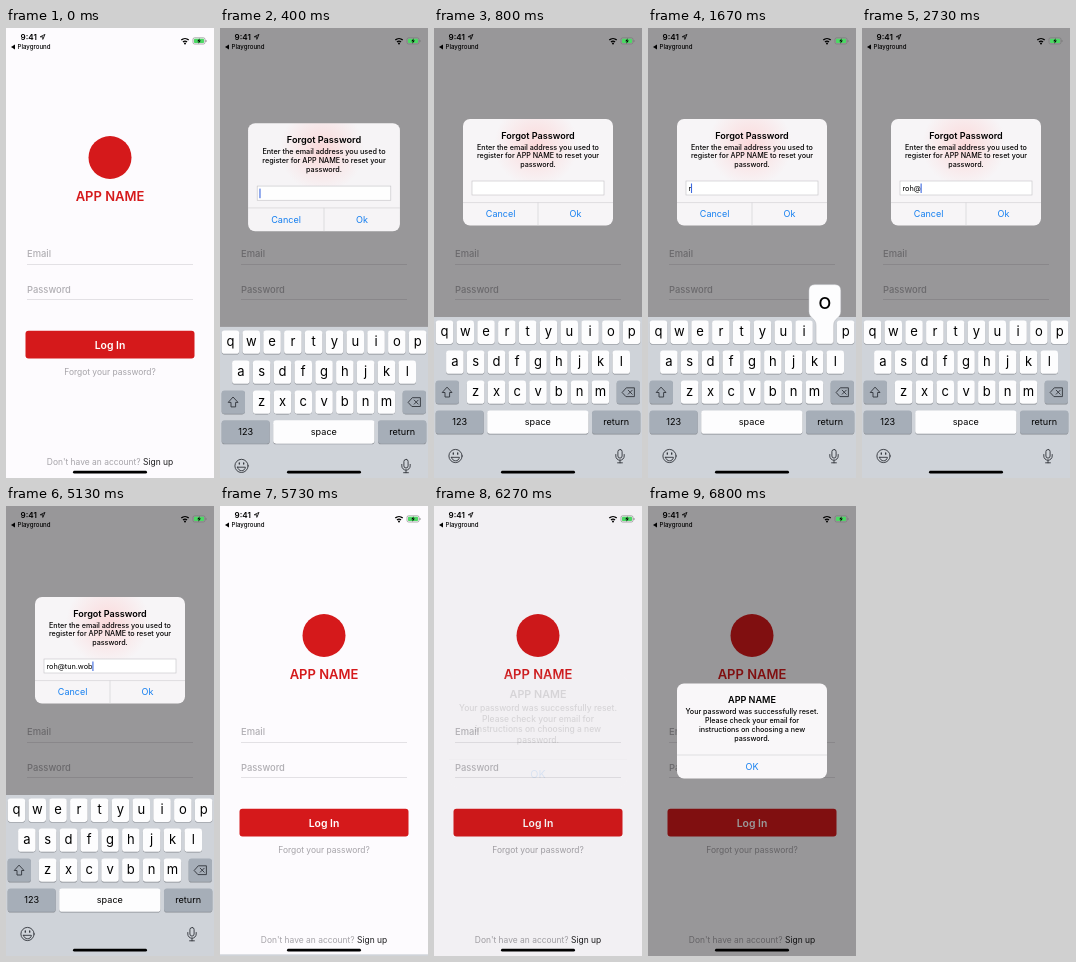
Write an HTML page that moves like this. It is 208 px wide and 450 px high and loops after 6870 ms.

```html
<!DOCTYPE html>
<html lang="en">
<head>
<meta charset="utf-8">
<title>Password reset</title>
<style>
  html, body { margin: 0; width: 100%; height: 100%; overflow: hidden; background: #fdfbfe; }
  svg { display: block; width: 208px; height: 450px; font-family: Inter, Roboto, sans-serif; }
  text { white-space: pre; }
  .mid { text-anchor: middle; }
  .title { font-size: 9.05px; font-weight: 600; }
  .msg { font-size: 7.15px; font-weight: 500; }
  .action { font-size: 9px; fill: #147ff0; }
  .hint { font-size: 9.4px; font-weight: 500; fill: #b0aeb3; }
  .small { font-size: 8.45px; fill: #a5a3a8; }
  .rule { stroke: #e3e1e5; stroke-width: 1; }
  .split { stroke: #cfcdd1; stroke-width: .6; }
  .line { fill: none; stroke: #30343a; stroke-width: .9; stroke-linejoin: round; stroke-linecap: round; }
</style>
</head>
<body>
<svg viewBox="0 0 208 450">
  <defs>
    <radialGradient id="glow" gradientUnits="userSpaceOnUse" cx="102" cy="117" r="42">
      <stop offset="0" stop-color="#fbd9da"/>
      <stop offset="1" stop-color="#f7f5f7"/>
    </radialGradient>
  </defs>

  <rect width="208" height="450" fill="#fdfbfe"/>
  <circle cx="104" cy="129.5" r="21.5" fill="#d5191b"/>
  <text class="mid" x="104" y="172.8" font-size="13" font-weight="600" fill="#d5191b">APP NAME</text>
  <text class="hint" x="21" y="229.2">Email</text>
  <path class="rule" d="M21 236.5H187M21 271.5H187"/>
  <text class="hint" x="21" y="264.6">Password</text>
  <rect x="19.5" y="302.8" width="169" height="27.6" rx="3" fill="#d5191b"/>
  <text class="mid" x="104" y="320.5" font-size="10.4" font-weight="600" fill="#fff">Log In</text>
  <text id="forgot" class="mid small" x="104" y="347.4">Forgot your password?</text>
  <text class="mid small" x="104" y="436.8">Don't have an account? <tspan fill="#1c1c1e">Sign up</tspan></text>

  <rect id="dim" width="208" height="450"/>

  <g id="ask">
    <rect x="29" y="91" width="150" height="106.6" rx="7" fill="url(#glow)"/>
    <path id="okPress" d="M104 174.6H179V190.6a7 7 0 0 1-7 7H104Z" fill="#dddbde"/>
    <text class="mid title" x="104" y="110.8">Forgot Password</text>
    <text class="mid msg" x="104" y="121.5">Enter the email address you used to</text>
    <text class="mid msg" x="104" y="130.4">register for APP NAME to reset your</text>
    <text class="mid msg" x="104" y="139.3">password.</text>
    <rect x="38" y="153" width="132" height="14" fill="#fff" stroke="#c3c1c5" stroke-width=".6"/>
    <text id="typed" x="40.4" y="162.6" font-size="7.3"></text>
    <rect id="caret" y="155.5" width="1.1" height="9.5" fill="#3f6be0"/>
    <path class="split" d="M29 174.6H179M104 174.6V197.6"/>
    <text class="mid action" x="66.6" y="189.2">Cancel</text>
    <text class="mid action" x="141.5" y="189.2">Ok</text>
  </g>

  <g id="done">
    <rect x="29" y="177.5" width="150" height="95" rx="7" fill="#f9f7f9"/>
    <text class="mid title" x="104" y="197">APP NAME</text>
    <text class="mid msg" x="104" y="208.2">Your password was successfully reset.</text>
    <text class="mid msg" x="104" y="217.1">Please check your email for</text>
    <text class="mid msg" x="104" y="226">instructions on choosing a new</text>
    <text class="mid msg" x="104" y="234.9">password.</text>
    <path class="split" d="M29 249H179"/>
    <text class="mid action" x="104" y="264.2">OK</text>
  </g>

  <g id="keyboard">
    <rect y="289" width="208" height="163" fill="#cfd3d9"/>
    <g id="common"></g>
    <g id="letters"></g>
    <g id="symbols"></g>
    <g class="line">
      <circle cx="21.5" cy="428" r="6.6"/>
      <path d="M17.6 429.3H25.4C25 434 18 434 17.6 429.3Z"/>
      <path d="M19.3 425v1.2M23.7 425v1.2" stroke-width="1.3"/>
      <rect x="183.9" y="421.5" width="4.2" height="8.6" rx="2.1"/>
      <path d="M181.8 426.5v1.5a4.2 4.2 0 0 0 8.4 0v-1.5M186 432.2v2.6M183.6 434.8h4.8"/>
    </g>
    <g id="popup">
      <path fill="#fdfdfe" stroke="#a9acb1" stroke-width=".4"/>
      <text class="mid" font-size="22"></text>
    </g>
  </g>

  <text x="14.5" y="12" font-size="8.1" font-weight="600">9:41</text>
  <path d="M39 6.4 36.8 11.4V8.8H34.2Z" fill="none" stroke="#000" stroke-width=".8"/>
  <path d="M9 16.4v5L5 18.9Z"/>
  <text x="11.5" y="21.3" font-size="6.1" font-weight="500">Playground</text>
  <path d="M175.3 12.1a5.4 5.4 0 0 1 7.4 0M177 14a3 3 0 0 1 4 0" fill="none" stroke="#000" stroke-width="1.4"/>
  <circle cx="179" cy="15.5" r="1"/>
  <rect x="187" y="9.8" width="12" height="6.2" rx="1.6" fill="none" stroke="#777" stroke-width=".6"/>
  <rect x="188" y="10.8" width="10" height="4.2" rx=".8" fill="#4cd964"/>
  <path d="M193.8 10.2 191.2 13.3H192.8L192.3 15.7 194.9 12.5H193.2Z"/>
  <path d="M200 12v2" stroke="#777" stroke-width=".8"/>
  <rect x="67" y="442.8" width="74" height="2.8" rx="1.4"/>
</svg>

<script>
const LOOP = 6870;
const OPEN = 155, CLOSE = 5370, RESULT = 6250;
const KEYBOARD = 161;
const $ = id => document.getElementById(id);
const rowY = row => 292.6 + row * 29.95;
const keys = {};

// Each tap: character, finger down, finger up.
const taps = [
  ['r', 1270, 1400], ['o', 1600, 1730], ['h', 1800, 1930], ['@', 2200, 2330],
  ['t', 2930, 3060], ['u', 3200, 3330], ['n', 3400, 3530], ['.', 3670, 3760],
  ['w', 4270, 4400], ['o', 4530, 4660], ['b', 4870, 5000]
];

function addKey(layer, label, x, row, w, special) {
  const y = rowY(row), long = label.length > 1;
  const fill = special ? '#a6aeb8' : '#fdfdfe';
  $(layer).innerHTML +=
    `<rect x="${x}" y="${y + .7}" width="${w}" height="23.3" rx="2.8" fill="#888c92"/>
     <rect x="${x}" y="${y}" width="${w}" height="23.3" rx="2.8" fill="${fill}"/>
     <text class="mid" x="${x + w / 2}" y="${y + (long ? 15 : 15.4)}"
       font-size="${long ? 9.1 : 13}">${label.replace('&', '&amp;')}</text>`;
  keys[label] = { x: x + w / 2, y, half: w / 2 };
}

function addRow(layer, labels, x, row, w = 17.5) {
  [...labels].forEach((label, i) => addKey(layer, label, x + i * (w + 3.3), row, w));
}

addRow('letters', 'qwertyuiop', 1.7, 0);
addRow('letters', 'asdfghjkl', 12.1, 1);
addRow('letters', 'zxcvbnm', 32.9, 2);
addKey('letters', '', 1.7, 2, 23.3, true);
addKey('letters', '123', 1.7, 3, 48, true);
$('letters').innerHTML +=
  '<path class="line" d="M13.3 359.4 18 364.5H15.6V369H11V364.5H8.6Z"/>';

addRow('symbols', '1234567890', 1.7, 0);
addRow('symbols', '-/:;()$&@"', 1.7, 1);
addRow('symbols', ".,?!'", 32.9, 2, 25.8);
addKey('symbols', '#+=', 1.7, 2, 23.3, true);
addKey('symbols', 'ABC', 1.7, 3, 48, true);

addKey('common', 'space', 53.2, 3, 101.3);
addKey('common', 'return', 158, 3, 48.3, true);
addKey('common', '', 182.7, 2, 23.3, true);
$('common').innerHTML +=
  '<path class="line" d="M188.4 364.2 192.3 359.8H200.4V368.6H192.3ZM194.2 362.2l4 4m0-4-4 4"/>';

// Critically damped spring from 0 to 1.
function spring(ms) {
  const x = Math.max(0, ms) * .01826;
  return 1 - (1 + x) * Math.exp(-x);
}

const fadeIn = p => 1 - (1 - p) ** 2;
const fadeOut = p => (1 - p) ** 2;
const during = (t, from, to) => t >= from && t < to;
const show = (id, on) => $(id).setAttribute('display', on ? 'inline' : 'none');

function placeAlert(id, alpha, scale, cy, shift) {
  show(id, alpha > .004);
  $(id).setAttribute('opacity', alpha);
  $(id).setAttribute('transform',
    `translate(104 ${cy + shift}) scale(${scale}) translate(-104 ${-cy})`);
}

function drawPopup(tap) {
  show('popup', tap);
  if (!tap) return;
  const { x, y, half } = keys[tap[0]], wide = half + 7.2;
  const [shape, label] = $('popup').children;
  shape.setAttribute('d',
    `M${x - wide} ${y - 30}q0-6 6-6H${x + wide - 6}q6 0 6 6V${y - 9}
     C${x + wide} ${y - 2} ${x + half} ${y - 3} ${x + half} ${y + 5}V${y + 20.5}
     q0 2.8-2.8 2.8H${x - half + 2.8}q-2.8 0-2.8-2.8V${y + 5}
     C${x - half} ${y - 3} ${x - wide} ${y - 2} ${x - wide} ${y - 9}Z`);
  label.setAttribute('x', x);
  label.setAttribute('y', y - 11.6);
  label.textContent = tap[0];
}

function drawInput(t) {
  const entered = taps.filter(tap => t >= tap[2]);
  const text = entered.map(tap => tap[0]).join('');
  const typed = $('typed');
  if (typed.textContent !== text) typed.textContent = text;
  const age = (t - (entered.length ? entered.at(-1)[2] : 200)) % 1000;
  show('caret', !during(age, 600, 870));
  $('caret').setAttribute('x', 40.2 + (text ? typed.getComputedTextLength() : 0));
}

function draw(t) {
  const opened = spring(t - OPEN), closed = spring(t - CLOSE), result = spring(t - RESULT);
  const drop = (1 - opened * (1 - closed)) * KEYBOARD;
  const askAlpha = fadeIn(opened) * fadeOut(closed), doneAlpha = fadeIn(result);

  $('forgot').setAttribute('opacity', during(t, 70, 240) ? .35 : 1);
  $('dim').setAttribute('opacity', .4 * Math.max(askAlpha, doneAlpha));

  placeAlert('ask', askAlpha, 1.2 - .2 * opened, 144.3, drop / 2);
  placeAlert('done', doneAlpha, 1.2 - .2 * result, 225, 0);
  show('okPress', during(t, 5200, CLOSE + 130));

  $('keyboard').setAttribute('transform', `translate(0 ${drop})`);
  show('keyboard', drop < KEYBOARD);
  const symbols = during(t, 2070, 2530) || during(t, 3600, 3930);
  show('letters', !symbols);
  show('symbols', symbols);

  drawInput(t);
  drawPopup(taps.find(tap => during(t, tap[1], tap[2])));
}

function frame() {
  draw(performance.now() % LOOP);
  requestAnimationFrame(frame);
}
frame();
</script>
</body>
</html>
```
